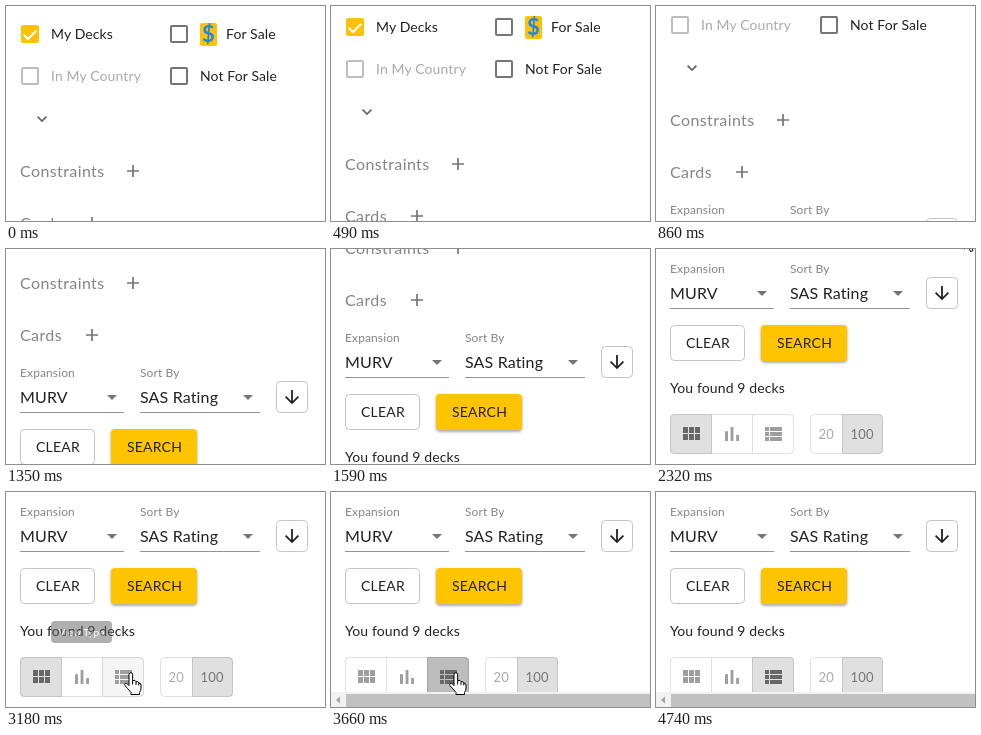
An HTML page for the animation above (5.11 s loop, 319 by 215 pixels).

```html
<!DOCTYPE html>
<html lang="en">
<head>
<meta charset="utf-8">
<title>Deck search</title>
<style>
  html, body { margin: 0; height: 100%; overflow: hidden; background: #fff; }
  svg { display: block; width: 100vw; height: 100vh; }
  text { font: 14px Lato, sans-serif; letter-spacing: .008em; fill: #212121; white-space: pre; }
  .big { font-size: 16px; letter-spacing: .00938em; }
  .head { font-size: 16px; letter-spacing: .025em; fill: #858585; }
  .label { font-size: 12px; letter-spacing: .00938em; fill: #858585; }
  .button { letter-spacing: .014em; }
  .small { font-size: 13px; letter-spacing: .014em; }
  .grey { fill: #757575; }
  .off { fill: #9e9e9e; }
  .faint { fill: #aaa; }
  .box { fill: none; stroke: #757575; stroke-width: 2; }
  .plus { fill: none; stroke: #757575; stroke-width: 1.7; }
  .line { fill: none; stroke: #949494; }
  .frame { fill: none; stroke: #c4c4c4; }
  .toggle { fill: none; stroke: #0000001f; }
  .search { fill: #ffc400; filter: drop-shadow(0 2px 1px #0003) drop-shadow(0 1px 1.5px #0003); }
  .pointer { fill: #fff; stroke: #000; stroke-linejoin: round; }
</style>
</head>
<body>
<svg viewBox="0 0 319 215">
  <defs>
    <path id="plus" class="plus" d="M-6 0H6M0-6V6"/>
    <path id="drop" class="grey" d="M0 0h10l-5 5z"/>
    <rect id="check" x="1" y="1" width="16" height="16" rx="1"/>
  </defs>

  <g id="page">
    <!-- filters -->
    <rect x="15" y="19" width="18" height="18" rx="2" fill="#ffc107"/>
    <path d="M17.7 28.7l4.3 4.3 8.3-8.3" fill="none" stroke="#fff" stroke-width="2"/>
    <use href="#check" class="box" x="164" y="19"/>
    <use href="#check" class="box" x="15" y="61" style="stroke:#bdbdbd"/>
    <use href="#check" class="box" x="164" y="61"/>
    <rect x="194" y="17" width="17" height="23" rx="2" fill="#ffc107"/>
    <text x="202.5" y="36" text-anchor="middle" style="font-size:22px;fill:#1e88e5;font-weight:bold">$</text>
    <text x="45" y="33">My Decks</text>
    <text x="220" y="33">For Sale</text>
    <text x="45" y="75" class="faint">In My Country</text>
    <text x="194" y="75">Not For Sale</text>
    <path d="M31.6 110.7l4.4 4.4 4.4-4.4" fill="none" stroke="#666" stroke-width="1.7"/>

    <text x="14" y="171" class="head">Constraints</text>
    <use href="#plus" x="127" y="165"/>
    <text x="14" y="223" class="head">Cards</text>
    <use href="#plus" x="86" y="217"/>

    <!-- selects -->
    <text x="14" y="259" class="label">Expansion</text>
    <text x="134" y="259" class="label">Sort By</text>
    <text x="14" y="285" class="big">MURV</text>
    <text x="134" y="285" class="big">SAS Rating</text>
    <path class="line" d="M14 294.5H118M134 294.5H254"/>
    <use href="#drop" x="101" y="277"/>
    <use href="#drop" x="237" y="277"/>
    <rect class="frame" x="270.5" y="263.5" width="31" height="31" rx="4"/>
    <path d="M286 272v12.5M279.6 278.7l6.4 6.4 6.4-6.4" fill="none" stroke="#212121" stroke-width="1.8"/>

    <!-- buttons -->
    <rect class="frame" x="14.5" y="311.5" width="74" height="35" rx="4"/>
    <text x="30" y="334" class="button">CLEAR</text>
    <rect class="search" x="105" y="311" width="86" height="36" rx="4"/>
    <text x="121" y="334" class="button">SEARCH</text>
    <text x="14" y="379">You found 9 decks</text>

    <!-- toggles -->
    <path id="gridBack" d="M56 400H18a4 4 0 0 0-4 4v32a4 4 0 0 0 4 4H56z"/>
    <path id="listBack" d="M96 400h38a4 4 0 0 1 4 4v32a4 4 0 0 1-4 4H96z"/>
    <path d="M186 400h37a4 4 0 0 1 4 4v32a4 4 0 0 1-4 4H186z" fill="#e0e0e0"/>
    <rect class="toggle" x="14.5" y="400.5" width="123" height="39" rx="4"/>
    <rect class="toggle" x="154.5" y="400.5" width="72" height="39" rx="4"/>
    <path class="toggle" d="M55.5 401v38M96.5 401v38M186.5 401v38"/>
    <path id="gridIcon" d="M27 413h5v6h-5zm6 0h5v6h-5zm6 0h5v6h-5zM27 420h5v6h-5zm6 0h5v6h-5zm6 0h5v6h-5z"/>
    <path class="off" d="M69 417.2h3v9.8h-3zM74.6 413h2.8v14h-2.8zM80.2 421H83v6h-2.8z"/>
    <path id="listIcon" d="M109 413h4v4h-4zm5 0h12v4h-12zM109 418h4v4h-4zm5 0h12v4h-12zM109 423h4v4h-4zm5 0h12v4h-12z"/>
    <text x="162.5" y="425" class="small faint">20</text>
    <text x="194.5" y="425" class="small grey">100</text>
  </g>

  <g id="tip">
    <rect x="45" y="129" width="61" height="22" rx="4" fill="#616161"/>
    <text x="75.5" y="143.5" text-anchor="middle" style="font-size:10px;fill:#fff">View Type</text>
  </g>

  <g id="bar">
    <rect y="200" width="319" height="15" fill="#f1f1f1"/>
    <rect x="15" y="202" width="304" height="13" fill="#c1c1c1"/>
    <path d="M9 204.5v7l-4-3.5z" fill="#a3a3a3"/>
  </g>

  <path id="arrow" class="pointer" d="M.5.5V16.2l3.6-3.4 2.5 5.9 2.5-1.1-2.5-5.7h5z"/>
  <g id="hand" class="pointer">
    <path d="M5 2.5a1.8 1.8 0 0 1 3.6 0V8.5q3-.8 3.4 1.2 2.4-.6 2.8 1.3 2.2-.2 2.2 2V16q0 2.5-1.5 4.5V22.5H7v-2Q3 16 1 13.5C0 11.5 2 10.5 3.3 11.8L5 13.6z"/>
    <path d="M8.6 8.5v4M12 9.7v3.3M14.8 11v2.5"/>
  </g>
</svg>
<script>
const LOOP = 5110;
const el = id => document.getElementById(id);

// Each row: start time, then the values held until the next row.
const scroll = [[0, 0], [490, 7], [610, 19], [730, 34], [860, 51], [980, 71], [1110, 91],
  [1230, 111], [1350, 131], [1470, 149], [1590, 166], [1710, 183], [1840, 199], [1960, 219], [2080, 235]];
const pointer = [[0, ''], [2320, 'arrow', 308, -16], [2440, 'arrow', 270, 42], [2560, 'arrow', 212, 104],
  [2690, 'arrow', 150, 154], [2810, 'hand', 120, 178], [2930, 'hand', 118, 180],
  [4000, 'hand', 200, 166], [4120, 'arrow', 189, 198], [4610, 'hand', 118, 181], [4740, '']];
const listFill = [[0, '#fff'], [2810, '#f5f5f5'], [3550, '#d4d4d4'], [3660, '#bdbdbd'], [3760, '#e0e0e0']];
const tipFade = [[0, 0], [3180, .5], [3310, .9], [3550, .4], [3660, 0]];

const held = (rows, t) => rows.findLast(row => row[0] <= t).slice(1);
const show = (id, on) => el(id).style.display = on ? '' : 'none';
const fill = (id, color) => el(id).style.fill = color;

function draw(t) {
  const listed = t >= 3660;
  el('page').setAttribute('transform', `translate(0 ${-held(scroll, t)[0]})`);
  fill('gridBack', listed ? '#fff' : '#e0e0e0');
  fill('gridIcon', listed ? '#9e9e9e' : '#676767');
  fill('listBack', held(listFill, t)[0]);
  fill('listIcon', listed ? '#676767' : '#9e9e9e');
  el('tip').style.opacity = held(tipFade, t)[0];
  show('bar', listed);

  const [kind, x, y] = held(pointer, t);
  for (const id of ['arrow', 'hand']) show(id, id === kind);
  if (kind) el(kind).setAttribute('transform', `translate(${x} ${y})`);
}

const start = performance.now();
function tick() {
  draw((performance.now() - start) % LOOP);
  requestAnimationFrame(tick);
}
tick();
</script>
</body>
</html>
```
